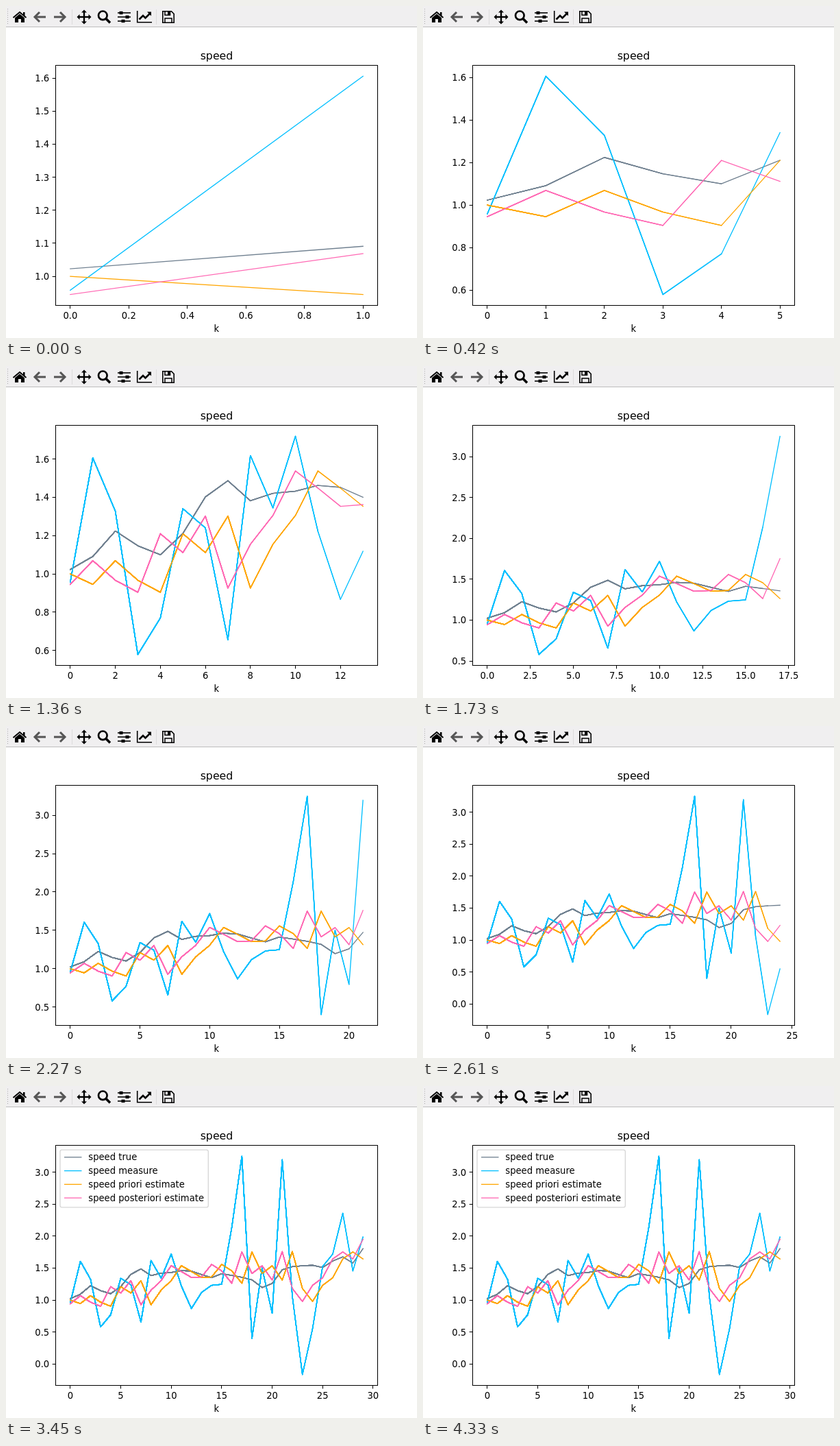
An HTML page with a canvas for the animation above (4.76 s loop, 600 by 484 pixels).

```html
<!DOCTYPE html>
<html lang="en">
<head>
<meta charset="utf-8">
<title>speed</title>
<style>
  html, body { margin: 0; width: 100%; height: 100%; overflow: hidden; background: #fff; }
  canvas { display: block; }
</style>
</head>
<body>
<canvas id="stage" width="600" height="484"></canvas>
<script>
const ctx = document.getElementById('stage').getContext('2d');
const LOOP = 4760, STEP = 114, LEAD = 98, LEGEND_AT = 3390, LAST = 29;
const FONT = '"DejaVu Sans", Verdana, sans-serif';
const box = { left: 72.5, right: 542.5, top: 86.5, bottom: 436.5 };

const actual = [1.023, 1.091, 1.224, 1.147, 1.1, 1.211, 1.402, 1.487, 1.382, 1.421,
  1.432, 1.462, 1.452, 1.4, 1.35, 1.413, 1.386, 1.357, 1.317, 1.196,
  1.259, 1.473, 1.522, 1.536, 1.545, 1.509, 1.611, 1.675, 1.579, 1.804];
const measure = [0.958, 1.606, 1.328, 0.579, 0.77, 1.341, 1.24, 0.656, 1.618, 1.345,
  1.719, 1.222, 0.867, 1.118, 1.231, 1.247, 2.137, 3.249, 0.402, 1.5,
  0.795, 3.196, 1.06, -0.164, 0.55, 1.525, 1.718, 2.358, 1.455, 1.986];
const posteriori = [0.945, 1.069, 0.967, 0.904, 1.21, 1.111, 1.302, 0.926, 1.155, 1.305,
  1.538, 1.448, 1.353, 1.362, 1.558, 1.457, 1.264, 1.751, 1.415, 1.536,
  1.313, 1.759, 1.182, 0.979, 1.23, 1.348, 1.643, 1.753, 1.643, 1.95];
// Each prior estimate is the preceding posterior.
const priori = [1, ...posteriori.slice(0, -1)];

const series = [
  { label: 'speed true', color: '#708090', data: actual },
  { label: 'speed measure', color: '#00bfff', data: measure },
  { label: 'speed priori estimate', color: '#ffa500', data: priori },
  { label: 'speed posteriori estimate', color: '#ff69b4', data: posteriori }
];

function line(points, color, width = 1.32) {
  ctx.strokeStyle = color;
  ctx.lineWidth = width;
  ctx.beginPath();
  points.forEach(([x, y]) => ctx.lineTo(x, y));
  ctx.stroke();
}

function shape(points, color) {
  ctx.fillStyle = color;
  ctx.beginPath();
  points.forEach(([x, y]) => ctx.lineTo(x, y));
  ctx.fill();
}

function rect(x, y, w, h, color) {
  ctx.fillStyle = color;
  ctx.fillRect(x, y, w, h);
}

function text(value, x, y, align = 'center', size = 13.17) {
  ctx.font = `${size}px ${FONT}`;
  ctx.textAlign = align;
  ctx.fillStyle = '#000';
  ctx.fillText(value, x, y);
}

// Axis view with 5% margins and at most nine intervals of a round step.
function axis(min, max, from, to) {
  const pad = (max - min) * 0.05, low = min - pad, high = max + pad;
  const raw = (high - low) / 9, power = 10 ** Math.floor(Math.log10(raw));
  const step = [1, 2, 2.5, 5, 10].find(s => s * power >= raw) * power;
  const decimals = [0, 1, 2].find(d => Math.abs(step * 10 ** d - Math.round(step * 10 ** d)) < 1e-6);
  const ticks = [];
  for (let i = Math.ceil(low / step); i * step <= high; i++) ticks.push(i * step);
  return {
    ticks,
    at: v => from + (v - low) / (high - low) * (to - from),
    label: v => v.toFixed(decimals).replace('-', '\u2212')
  };
}

function arrow(x, dir) {
  line([[x + 9 * dir, 16], [x - 7 * dir, 16]], '#555', 3);
  line([[x, 9], [x - 7 * dir, 16], [x, 23]], '#555', 3);
}

function toolbar() {
  rect(0, 0, 600, 30, '#f0eff0');
  rect(0, 30, 600, 1, '#bdbdbd');
  for (let y = 4; y < 28; y += 3) rect(2, y, 1, 1, '#aaa');
  for (const x of [96, 219]) rect(x, 5, 1, 22, '#dcdcdc');
  ctx.lineCap = 'butt';
  ctx.lineJoin = 'miter';

  // Home
  line([[10.5, 17], [20, 9], [29.5, 17]], '#000', 2);
  shape([[13, 17.3], [20, 11.5], [27, 17.3], [27, 24], [22, 24], [22, 19], [18, 19], [18, 24], [13, 24]], '#000');
  rect(25, 9, 2.5, 5, '#000');

  arrow(49, 1);
  arrow(79, -1);

  // Pan
  line([[105, 16], [123, 16]], '#000', 2.4);
  line([[114, 7], [114, 25]], '#000', 2.4);
  for (const [dx, dy] of [[1, 0], [-1, 0], [0, 1], [0, -1]]) {
    const x = 114 + dx * 6.5, y = 16 + dy * 6.5;
    shape([[x + dx * 4, y + dy * 4], [x + dy * 4, y + dx * 4], [x - dy * 4, y - dx * 4]], '#000');
  }

  // Zoom
  ctx.strokeStyle = '#000';
  ctx.lineWidth = 2.7;
  ctx.beginPath();
  ctx.arc(141.3, 13.8, 6.3, 0, Math.PI * 2);
  ctx.stroke();
  line([[146, 18.5], [152, 24.5]], '#000', 3.6);

  // Sliders
  [[10, 168], [16, 177], [22, 171]].forEach(([y, x]) => {
    line([[163, y], [182, y]], '#000', 1.6);
    rect(x - 2.5, y - 2.2, 5, 4.4, '#000');
  });

  // Plot options
  line([[191.7, 7], [191.7, 23.7], [213, 23.7]], '#000', 1.6);
  line([[194.5, 19.5], [200, 14], [203.5, 17.5], [210, 11]], '#000', 2.6);
  shape([[206, 8.5], [212, 8.5], [212, 14.5]], '#000');

  // Save
  line([[228.8, 7.8], [241.5, 7.8], [245.2, 11.5], [245.2, 24.2], [228.8, 24.2], [228.8, 7]], '#000', 1.6);
  line([[232, 8], [232, 13.2], [239.5, 13.2], [239.5, 8]], '#000', 1.5);
  rect(236, 8, 3, 5, '#000');
  line([[232, 24], [232, 18], [242, 18], [242, 24]], '#000', 1.5);
}

function legend() {
  ctx.beginPath();
  ctx.roundRect(79, 93.2, 216.3, 83.6, 2.6);
  ctx.fillStyle = 'rgba(255,255,255,.8)';
  ctx.fill();
  ctx.strokeStyle = 'rgba(204,204,204,.8)';
  ctx.lineWidth = 1.32;
  ctx.stroke();
  series.forEach(({ label, color }, i) => {
    const y = 103.8 + i * 19.8;
    line([[85, y], [110.5, y]], color);
    text(label, 120.3, y + 4.5, 'left');
  });
}

function draw(count, finished) {
  rect(0, 0, 600, 484, '#fff');
  toolbar();

  const seen = series.flatMap(s => s.data.slice(0, count + 1));
  const xAxis = axis(0, count, box.left, box.right);
  const yAxis = axis(Math.min(...seen), Math.max(...seen), box.bottom, box.top);

  // Every pass replots the lines, so older segments grow heavier.
  ctx.lineJoin = 'round';
  ctx.lineCap = 'square';
  const passes = count + (finished ? 1 : 0);
  for (let pass = 1; pass <= passes; pass++) {
    for (const { data, color } of series) {
      line(data.slice(0, Math.min(pass, count) + 1).map((v, k) => [xAxis.at(k), yAxis.at(v)]), color);
    }
  }

  ctx.lineCap = 'butt';
  for (const v of xAxis.ticks) {
    const x = Math.round(xAxis.at(v) - 0.5) + 0.5;
    line([[x, box.bottom], [x, box.bottom + 4.8]], '#000', 1.05);
    text(xAxis.label(v), xAxis.at(v), 456.3);
  }
  for (const v of yAxis.ticks) {
    const y = Math.round(yAxis.at(v) - 0.5) + 0.5;
    line([[box.left - 4.8, y], [box.left, y]], '#000', 1.05);
    text(yAxis.label(v), 63.2, yAxis.at(v) + 4.9, 'right');
  }
  ctx.strokeStyle = '#000';
  ctx.lineWidth = 1.05;
  ctx.strokeRect(box.left, box.top, box.right - box.left, box.bottom - box.top);

  text('speed', 307.5, 78, 'center', 15.8);
  text('k', 307.3, 474.5);
  if (finished) legend();
}

const start = performance.now();
let shown = '';

function tick() {
  const t = Math.max(0, performance.now() - start) % LOOP;
  const count = Math.min(LAST, 1 + Math.floor((t + LEAD) / STEP));
  const finished = t >= LEGEND_AT;
  const state = `${count} ${finished}`;
  if (state !== shown) {
    draw(count, finished);
    shown = state;
  }
  requestAnimationFrame(tick);
}
tick();
</script>
</body>
</html>
```
